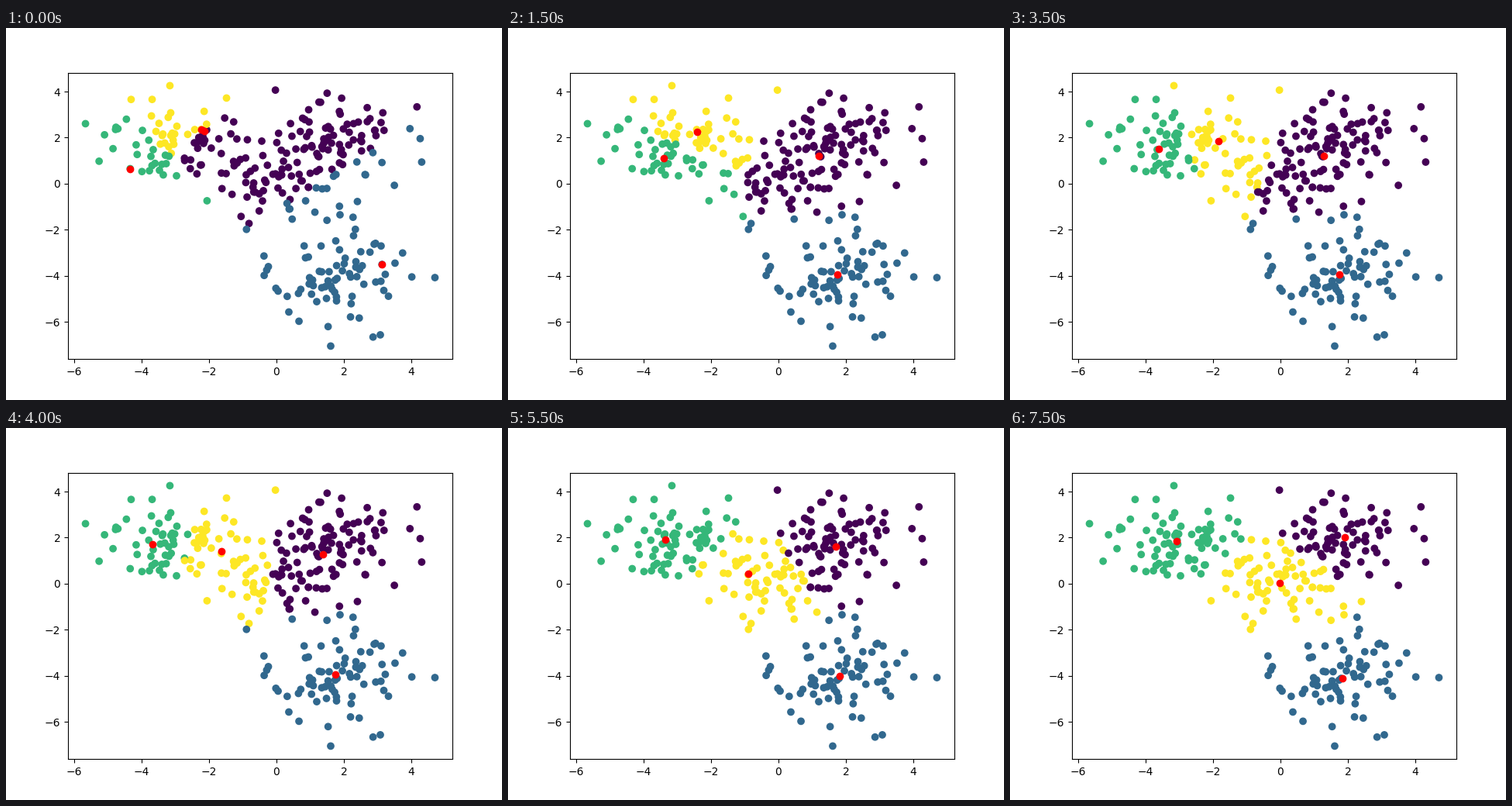
Animation, 640 px wide and 480 px high, one loop 8 s. Source, as a matplotlib script:

```python
import matplotlib.pyplot as plt
import numpy as np
from matplotlib.animation import FuncAnimation

STEPS = 16
INTERVAL = 500
BLOB_CENTERS = [(0, 0), (2, 2), (-3, 2), (2, -4)]
BLOB_SIZE = 75
# Approximate positions of the data points used as starting centroids
SEEDS = np.array([(-2.13, 2.28), (3.13, -3.5), (-4.33, 0.65), (-2.23, 2.35)])


def make_blobs():
    rng = np.random.RandomState(0)
    points = np.vstack([rng.normal(center, 1.0, (BLOB_SIZE, 2))
                        for center in BLOB_CENTERS])
    order = np.arange(len(points))
    rng.shuffle(order)
    return points[order]


def distances(points, centroids):
    return np.linalg.norm(points[:, None] - centroids[None], axis=2)


def lloyd(points, centroids, steps):
    """Return (centroids, labels) for each step of k-means."""
    history = []
    for _ in range(steps):
        labels = distances(points, centroids).argmin(axis=1)
        history.append((centroids, labels))
        centroids = np.array([points[labels == k].mean(axis=0)
                              for k in range(len(centroids))])
    return history


points = make_blobs()
start = points[distances(points, SEEDS).argmin(axis=0)]
history = lloyd(points, start, STEPS)

fig, ax = plt.subplots(figsize=(6.4, 4.8), dpi=100)
dots = ax.scatter(*points.T, c=history[0][1], cmap="viridis", vmin=0, vmax=3)
markers = ax.scatter(*start.T, c="r")
ax.set_xlim(ax.get_xlim())
ax.set_ylim(ax.get_ylim())


def update(step):
    centroids, labels = history[step]
    dots.set_array(labels)
    markers.set_offsets(centroids)
    return dots, markers


animation = FuncAnimation(fig, update, frames=STEPS, interval=INTERVAL,
                          repeat=True, repeat_delay=0)
plt.show()
```
